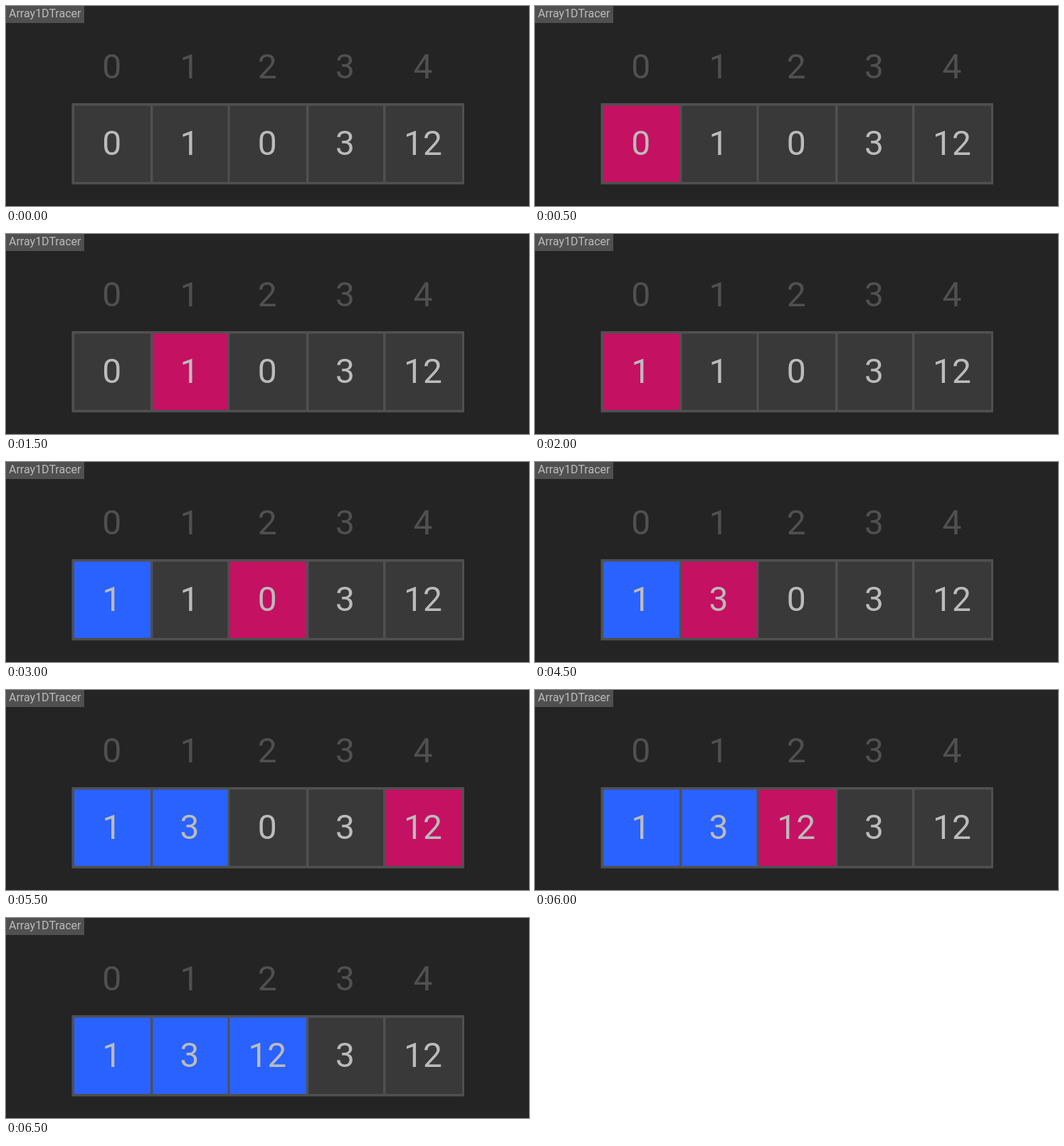
Write an HTML page that moves like this. It is 735 by 282 pixels and loops after 7 s.

```html
<!DOCTYPE html>
<html lang="en">
<head>
<meta charset="utf-8">
<title>Array1DTracer</title>
<style>
  html, body { margin: 0; width: 100%; height: 100%; overflow: hidden; background: #242424; }
  svg { display: block; width: 735px; height: 282px; font-family: Roboto, sans-serif; }
  .digits { font-size: 48px; text-anchor: middle; }
</style>
</head>
<body>
<svg id="stage" viewBox="0 0 735 282">
  <rect width="735" height="282" fill="#242424"/>
  <rect width="110" height="24" fill="#505050"/>
  <text x="4" y="16" font-size="16" fill="#bbb">Array1DTracer</text>
  <rect x="92.5" y="137" width="551.5" height="114.5" fill="#505050"/>
</svg>
<script>
const PLAIN = '#393939', PINK = '#c51162', BLUE = '#2962ff';
const STEP = 500;
const START = [0, 1, 0, 3, 12];
const EDGES = [[96, 203], [206.5, 311.5], [314.5, 422], [425.5, 530], [533.5, 641]];

// Each step lists its changes as [cell, colour, new value].
const STEPS = [
  [],
  [[0, PINK]],
  [[0, PLAIN]],
  [[1, PINK]],
  [[1, PLAIN], [0, PINK, 1]],
  [[0, BLUE]],
  [[2, PINK]],
  [[2, PLAIN]],
  [[3, PINK]],
  [[3, PLAIN], [1, PINK, 3]],
  [[1, BLUE]],
  [[4, PINK]],
  [[4, PLAIN], [2, PINK, 12]],
  [[2, BLUE]]
];

const stage = document.getElementById('stage');

function add(tag, attrs, text = '') {
  const el = document.createElementNS('http://www.w3.org/2000/svg', tag);
  for (const key in attrs) el.setAttribute(key, attrs[key]);
  el.textContent = text;
  return stage.appendChild(el);
}

const cells = EDGES.map(([left, right], i) => {
  const x = 148.7 + 109.3 * i;
  add('text', { class: 'digits', x, y: 102, fill: '#505050' }, i);
  return {
    box: add('rect', { x: left, y: 140.5, width: right - left, height: 107.5, fill: PLAIN }),
    label: add('text', { class: 'digits', x, y: 210, fill: '#bbb' }, START[i])
  };
});

function render(time) {
  const step = Math.floor(time / STEP) % STEPS.length;
  const state = START.map(value => ({ value, color: PLAIN }));
  for (const changes of STEPS.slice(0, step + 1)) {
    for (const [i, color, value = state[i].value] of changes) state[i] = { value, color };
  }
  cells.forEach(({ box, label }, i) => {
    box.setAttribute('fill', state[i].color);
    label.textContent = state[i].value;
  });
}

const origin = performance.now();
function tick() {
  render(performance.now() - origin);
  requestAnimationFrame(tick);
}
tick();
</script>
</body>
</html>
```
